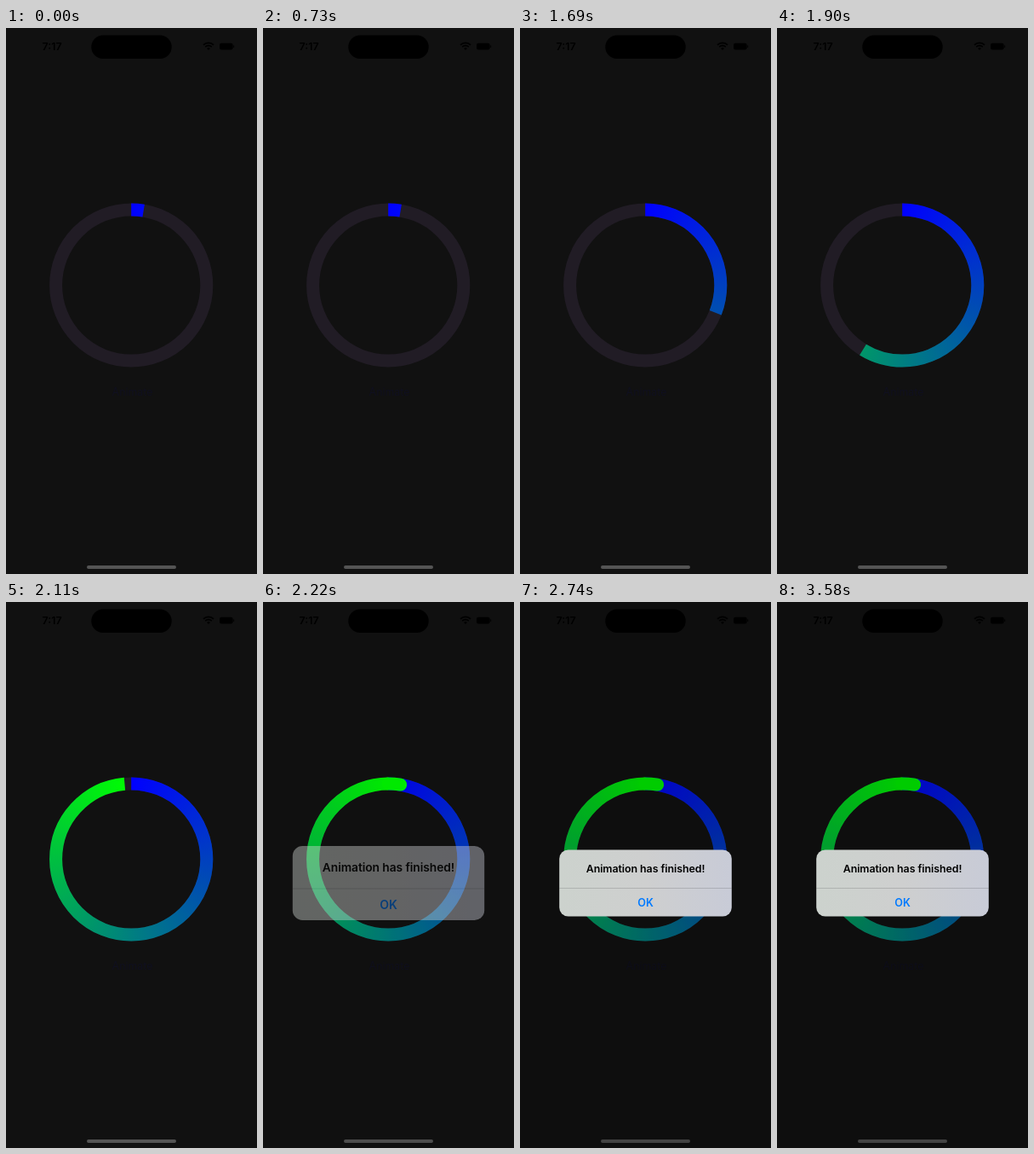
An HTML page with a canvas for the animation above (3.71 s loop, 295x640 px).

```html
<!DOCTYPE html>
<html lang="en">
<head>
<meta charset="utf-8">
<title>Ring progress</title>
<style>
  html, body { margin: 0; width: 100%; height: 100%; overflow: hidden; background: #111; }
  canvas, svg { position: absolute; left: 0; top: 0; width: 295px; height: 640px; }
  text { font-family: Inter, Roboto, sans-serif; text-anchor: middle; }
  .bold { font-weight: 600; }
</style>
</head>
<body>
<canvas id="ring"></canvas>
<svg viewBox="0 0 295 640">
  <defs>
    <linearGradient id="glass">
      <stop offset="0" stop-color="#ccd2cd"/>
      <stop offset=".5" stop-color="#cecfcf"/>
      <stop offset="1" stop-color="#c8cbd7"/>
    </linearGradient>
  </defs>

  <text class="bold" x="54" y="26.4" font-size="12.4">7:17</text>
  <rect x="100.3" y="8.5" width="94.4" height="27.6" rx="13.8"/>
  <g fill="none" stroke="#000" stroke-width="1.7">
    <path d="M232 19.8a8.4 8.4 0 0 1 12 0M234.2 22.2a5.4 5.4 0 0 1 7.6 0"/>
    <path d="M238 26l-1.9-2a2.7 2.7 0 0 1 3.8 0z" fill="#000" stroke="none"/>
  </g>
  <rect x="251" y="17.8" width="15.6" height="7.6" rx="2.2"/>
  <rect x="267.2" y="20.2" width="1" height="2.8" rx=".5"/>
  <text x="148.5" y="431" font-size="12.4" fill="#10101f">Animate</text>
  <rect x="95" y="630" width="105" height="4" rx="2" fill="#545454"/>

  <rect id="dim" width="295" height="640"/>
  <g id="alert">
    <rect x="46.2" y="290.4" width="202.6" height="78.2" rx="10.5" fill="url(#glass)"/>
    <rect x="46.2" y="335" width="202.6" height=".7" fill="#3c3c43" opacity=".3"/>
    <text class="bold" x="147.5" y="317.3" font-size="12.4" letter-spacing="-.06">Animation has finished!</text>
    <text class="bold" x="147.5" y="356.9" font-size="12.6" fill="#007aff">OK</text>
  </g>
</svg>
<script>
const LOOP = 3710, STEP = 105.5, LAST = 34;
const CX = 147.2, CY = 301.5, R = 88.6, WIDTH = 15, TOP = -Math.PI / 2;
const REST = 9.4;                       // degrees already filled at rest
const SPIN = { start: 1018, length: 1110 };
const POP = { start: 2185, decay: 53 };

const $ = id => document.getElementById(id);
const canvas = $('ring'), ctx = canvas.getContext('2d');
const ratio = window.devicePixelRatio || 1;
canvas.width = 295 * ratio;
canvas.height = 640 * ratio;
ctx.scale(ratio, ratio);
ctx.lineWidth = WIDTH;

const sweep = ctx.createConicGradient(TOP, CX, CY);
sweep.addColorStop(0, '#00f');
sweep.addColorStop(1, '#0f0');

function arc(from, to, color, cap = 'butt') {
  const rad = deg => TOP + deg * Math.PI / 180;
  ctx.beginPath();
  ctx.arc(CX, CY, R, rad(from), rad(to));
  ctx.strokeStyle = color;
  ctx.lineCap = cap;
  ctx.stroke();
}

function drawRing(angle) {
  const full = Math.min(angle, 360), mix = full / 360;
  ctx.clearRect(0, 0, 295, 640);
  arc(0, 360, '#211c25');
  arc(0, full, sweep);
  arc(0, 0.01, '#00f', 'round');
  arc(full - 0.01, angle, `rgb(0 ${255 * mix} ${255 * (1 - mix)})`, 'round');
}

function drawAlert(t) {
  const left = t < POP.start ? 1 : Math.exp((POP.start - t) / POP.decay);
  const scale = 1 + 0.2 * left;
  $('dim').setAttribute('opacity', 0.2 * (1 - left));
  $('alert').setAttribute('opacity', 1 - left);
  $('alert').setAttribute('transform',
    `translate(147.5 329.5) scale(${scale}) translate(-147.5 -329.5)`);
}

function render(now) {
  // The picture advances in even steps; the last one is held a little longer.
  const step = Math.min(LAST, Math.floor((now % LOOP + 8) / STEP));
  const t = step * STEP;
  const p = Math.min(1, Math.max(0, (t - SPIN.start) / SPIN.length));
  drawRing(REST + 360 * p ** 2.5);
  drawAlert(t);
}

const begin = performance.now();
function tick() {
  render(performance.now() - begin);
  requestAnimationFrame(tick);
}
tick();
</script>
</body>
</html>
```
